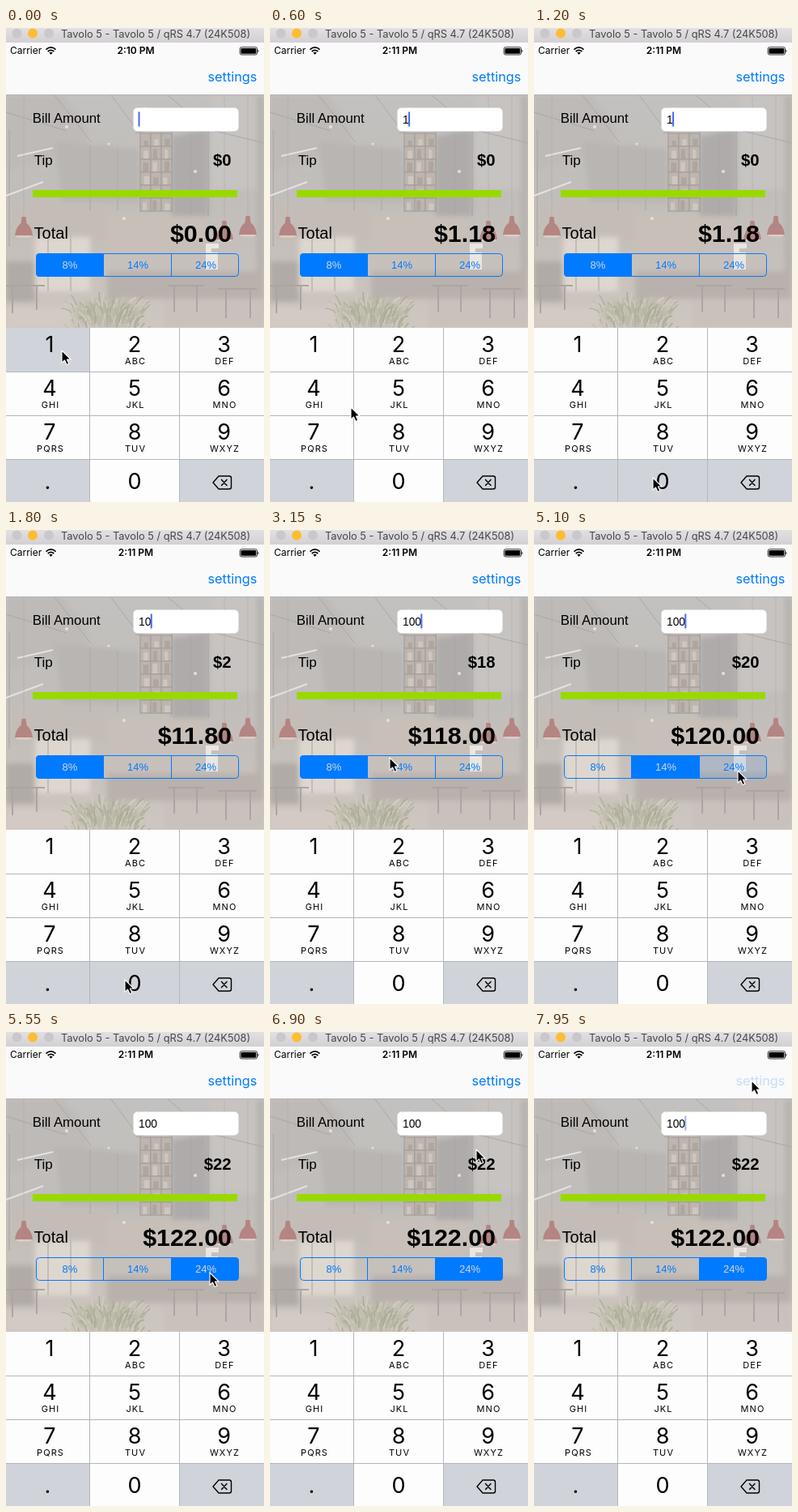
An HTML page that plays this animation: 319 px wide and 585 px high, repeating every 8000 ms.

```html
<!DOCTYPE html>
<html lang="en">
<head>
<meta charset="utf-8">
<title>Tip calculator</title>
<style>
html, body { margin: 0; width: 100%; height: 100%; overflow: hidden; background: #fff; }
svg { display: block; width: 100vw; height: 100vh; }
text { font-family: "Liberation Sans", Arial, sans-serif; fill: #000; white-space: pre; }
.ui { font-family: Inter, Roboto, sans-serif; }
.mid { text-anchor: middle; }
.end { text-anchor: end; font-weight: bold; }
.digit { font-size: 27px; }
.letters { font-size: 11px; letter-spacing: 1.1px; }
.seg { font-size: 13px; }
</style>
</head>
<body>
<svg viewBox="0 0 319 585">
  <defs>
    <linearGradient id="bar" x2="0" y2="1">
      <stop offset="0" stop-color="#e3e0e3"/><stop offset="1" stop-color="#d3d0d3"/>
    </linearGradient>
    <linearGradient id="room" x2="0" y2="1">
      <stop offset="0" stop-color="#c3c1bf"/><stop offset=".4" stop-color="#c0bdba"/>
      <stop offset=".7" stop-color="#c6c0bb"/><stop offset="1" stop-color="#cec6c1"/>
    </linearGradient>
    <filter id="soft" x="-20%" y="-20%" width="140%" height="140%"><feGaussianBlur stdDeviation="3"/></filter>
    <filter id="fine" x="-20%" y="-20%" width="140%" height="140%"><feGaussianBlur stdDeviation=".7"/></filter>
    <clipPath id="photo"><rect y="83" width="319" height="287"/></clipPath>
    <clipPath id="segClip"><rect x="37" y="278" width="251" height="29" rx="4.5"/></clipPath>
    <g id="lamp">
      <path d="M0-170V-14" stroke="#b3aeab" stroke-width=".7"/>
      <path d="M-2.5-16H2.5L3.500-8Q10-3 11 7H-11Q-10-3-3.500-8Z" fill="#b48582"/>
      <path d="M-10 7H10L8 9.500H-8Z" fill="#ddcdc6"/>
    </g>
  </defs>

  <!-- restaurant interior -->
  <g clip-path="url(#photo)">
    <rect y="83" width="319" height="287" fill="url(#room)"/>
    <g filter="url(#soft)">
      <path d="M0 83H70L100 120V150L0 175Z" fill="#bdbab8"/>
      <path d="M60 140L165 150V215H70Z" fill="#b8b5b2"/>
      <path d="M205 134L250 125V232H205Z" fill="#aeabaa"/>
      <path d="M252 83H319V200H252Z" fill="#c6c3c1"/>
      <path d="M0 215H130V262H0Z" fill="#c4bdb7"/>
      <path d="M36 258H104V325H36Z" fill="#ded7cf"/>
      <path d="M125 232H245V275H125Z" fill="#c8c0b8"/>
      <path d="M125 300H319V334H125Z" fill="#b9b1ac"/>
      <path d="M195 334H319V370H195Z" fill="#c9c1bc"/>
      <path d="M0 288H36V338H0Z" fill="#b1aaa6"/>
      <path d="M0 345H90V370H0Z" fill="#d3cac5"/>
      <path d="M310 83H319V300H310Z" fill="#b7b2af"/>
      <ellipse cx="125" cy="352" rx="42" ry="18" fill="#bdbaab"/>
    </g>
    <g filter="url(#fine)" fill="none" stroke="#aba7a4">
      <path d="M0 104L75 127M60 83L105 140M130 83L165 130M160 130L205 118L250 125L319 142M200 83L250 125"/>
      <path d="M250 122V232M205 128V228M228 130V230" stroke-width="1.4"/>
      <path d="M4 125V270M104 145V225M138 150V225" stroke="#b2aeab" stroke-width="1.6"/>
      <path d="M14 158L58 148M0 207L46 190" stroke="#e4e1de" stroke-width="2.2"/>
      <path d="M52 230V325M80 230V325" stroke="#c4bdb6" stroke-width="2"/>
      <path d="M0 318H48M8 318V352M38 318V348M200 318H245M208 318V350M236 318V350M262 322H310M272 322V358M302 322V358" stroke="#aca5a1" stroke-width="2"/>
    </g>
    <g id="shelf" filter="url(#fine)"></g>
    <g filter="url(#fine)">
      <g fill="#e8e0d4">
        <circle cx="75" cy="122" r="2"/><circle cx="127" cy="143" r="1.6"/><circle cx="172" cy="100" r="2"/>
        <circle cx="234" cy="177" r="2"/><circle cx="146" cy="235" r="2"/>
      </g>
      <path d="M247 266H263V272H254V277H262V298H247Z" fill="#ebe6e1"/>
      <use href="#lamp" x="22" y="249"/>
      <use href="#lamp" x="270" y="254"/>
      <use href="#lamp" x="299" y="248"/>
    </g>
    <g id="plant" filter="url(#fine)" fill="none" stroke-width="1.6"></g>
  </g>

  <!-- window bar -->
  <rect width="319" height="18" fill="url(#bar)"/>
  <circle cx="13.500" cy="6.500" r="6" fill="#cac8ca"/>
  <circle cx="33" cy="6.500" r="6" fill="#fdbd2f"/>
  <circle cx="53" cy="6.500" r="6" fill="#cac8ca"/>
  <text class="ui" x="68" y="12" font-size="12.8" style="fill:#464646">Tavolo 5 - Tavolo 5 / qRS 4.7 (24K508)</text>

  <!-- status and navigation -->
  <rect y="18" width="319" height="64" fill="#fafafa"/>
  <rect y="82" width="319" height="1" fill="#b4b3b3"/>
  <text class="ui" x="5" y="32" font-size="12">Carrier</text>
  <g fill="none" stroke="#000" stroke-width="1.7">
    <path d="M49.5 26.6Q55.5 21.2 61.5 26.6M51.7 29Q55.5 25.6 59.3 29"/>
    <path d="M55.5 32.8L53.3 30.6Q55.5 28.8 57.7 30.6Z" fill="#000" stroke="none"/>
  </g>
  <text id="clock" class="ui mid" x="160.5" y="32" font-size="12" font-weight="600"></text>
  <rect x="289.2" y="23.700" width="21.300" height="9.300" rx="2" fill="none" stroke="#000" stroke-width=".8"/>
  <rect x="290.4" y="24.900" width="18.900" height="6.900" rx="1" fill="#000"/>
  <path d="M311.500 26.500Q313.500 28.400 311.500 30.300Z"/>
  <text id="settings" class="ui" x="249.5" y="66" font-size="16.3" style="fill:#007aff">settings</text>

  <!-- form -->
  <text x="32.8" y="117" font-size="16.8">Bill Amount</text>
  <rect x="157.5" y="98.5" width="130" height="29" rx="5" fill="#fff"/>
  <text id="bill" x="164" y="118" font-size="13.8"></text>
  <rect id="caret" y="103.5" width="2" height="18" fill="#426bf2"/>
  <text x="34.8" y="168.5" font-size="17">Tip</text>
  <text id="tip" class="end" x="278.6" y="170" font-size="20.3"></text>
  <rect x="33" y="200" width="253" height="9" fill="#99d900"/>
  <text x="34.6" y="259.6" font-size="20">Total</text>
  <text id="total" class="end" x="279" y="263.5" font-size="30.4"></text>

  <g id="segs" clip-path="url(#segClip)"></g>
  <path d="M120.5 278V307M204.5 278V307" stroke="#007aff"/>
  <rect x="37.5" y="278.5" width="250" height="28" rx="4" fill="none" stroke="#007aff"/>

  <!-- keypad -->
  <g id="keys"></g>
  <path d="M103.5 370V585M214.5 370V585M0 424.5H319M0 478.5H319M0 532.5H319" stroke="#b3b6bb" fill="none"/>
  <g fill="none" stroke="#000" stroke-width="1.4" stroke-linejoin="round" stroke-linecap="round">
    <path d="M256 561L263 553H276Q278.5 553 278.5 555.5V566.5Q278.5 569 276 569H263Z"/>
    <path d="M266.5 557.5L273 564.5M273 557.5L266.5 564.5"/>
  </g>

  <path id="mouse" d="M0 0V15.2L3.5 12L6 17.5L8.8 16.3L6.4 11H11Z" fill="#000" stroke="#fff" stroke-width="1.1" stroke-linejoin="round"/>
</svg>

<script>
const $ = id => document.getElementById(id);
const GREY = '#d0d4da', WHITE = '#fdfdfd', BLUE = '#007aff';
const LOOP = 8000, TICK = 150;

function add(parent, tag, attrs, content = '') {
  const el = document.createElementNS('http://www.w3.org/2000/svg', tag);
  for (const k in attrs) el.setAttribute(k, attrs[k]);
  el.textContent = content;
  return parent.appendChild(el);
}

let seed = 7;
const rnd = () => (seed = seed * 16807 % 2147483647) / 2147483647;

// wall shelf with jars
for (let i = 0; i < 18; i++) {
  const x = 166 + i % 3 * 13, y = 130 + Math.floor(i / 3) * 16, h = 6 + rnd() * 7;
  add($('shelf'), 'rect', { x, y, width: 13, height: 16, fill: '#bdb5ae', stroke: '#a5a19e', 'stroke-width': 1.3 });
  add($('shelf'), 'rect', { x: x + 2 + rnd() * 3, y: y + 15 - h, width: 4 + rnd() * 3, height: h, fill: i % 2 ? '#cfc7bf' : '#aea69f' });
}

// fan of leaves
for (let i = 0; i < 140; i++) {
  const x = 80 + rnd() * 90, y = 336 + rnd() * 38 + Math.abs(x - 126) * .15;
  add($('plant'), 'path', {
    d: `M${x} ${y}q${(x - 126) * .06} -6 ${(x - 126) * .2 + rnd() * 8 - 4} ${-6 - rnd() * 7}`,
    stroke: ['#b3b29f', '#c8c5b3', '#acab99', '#d1ccbd'][i % 4]
  });
}

// keypad
const cols = [[0, 104, 54], [104, 111, 159], [215, 104, 269.5]];
const labels = ['', 'ABC', 'DEF', 'GHI', 'JKL', 'MNO', 'PQRS', 'TUV', 'WXYZ'];
const keys = [...'123456789.0', ''].map((label, i) => {
  const [x, w, mid] = cols[i % 3], y = 370 + Math.floor(i / 3) * 54;
  const box = add($('keys'), 'rect', { x, y, width: w, height: 55, fill: i === 9 || i === 11 ? GREY : WHITE });
  add($('keys'), 'text', { class: 'ui mid digit', x: i === 9 ? 51.5 : mid, y: y + (i > 8 ? 37 : 29.5) }, label);
  add($('keys'), 'text', { class: 'ui mid letters', x: mid + 1, y: y + 45 }, labels[i]);
  return box;
});

// tip choices
const rates = [.18, .2, .22];
const segs = ['8%', '14%', '24%'].map((label, i) => ({
  box: add($('segs'), 'rect', { x: 37 + i * 83.7, y: 278, width: 83.7, height: 29, fill: BLUE }),
  text: add($('segs'), 'text', { class: 'mid seg', x: 79 + i * 84, y: 297 }, label)
}));

// pointer path: time, x, y
const path = [
  [300, 69, 398], [450, 78, 420], [600, 100, 468], [750, 125, 518], [900, 142, 547], [1050, 147, 555],
  [2400, 147, 555], [2550, 152, 525], [2700, 176, 440], [2850, 184, 355], [3000, 163, 300], [3150, 148, 281],
  [4200, 148, 281], [4350, 176, 287], [4500, 230, 297], [4650, 252, 297],
  [6750, 252, 297], [6900, 255, 145], [7050, 262, 95], [7200, 268, 67], [7350, 269, 60]
];
function pointer(t) {
  const i = path.findIndex(p => p[0] > t);
  if (i === 0) return path[0].slice(1);
  if (i < 0) return path[path.length - 1].slice(1);
  const [t0, x0, y0] = path[i - 1], [t1, x1, y1] = path[i], k = (t - t0) / (t1 - t0);
  return [x0 + (x1 - x0) * k, y0 + (y1 - y0) * k];
}

function caretAlpha(t) {
  if (t < 1950) return 1;
  const p = t % 1000 / 1000;
  if (p < .42) return 1;
  if (p < .54) return (.54 - p) / .12;
  return p < .9 ? 0 : (p - .9) / .1;
}

const within = (t, a, b) => t >= a && t < b;

function draw(t) {
  const bill = t < 150 ? '' : t < 1350 ? '1' : t < 1950 ? '10' : '100';
  const pick = t < 3750 ? 0 : t < 5250 ? 1 : 2;
  const held = within(t, 3600, 3750) ? 1 : within(t, 5100, 5250) ? 2 : -1;
  const tip = bill * rates[pick];

  $('clock').textContent = t < 150 ? '2:10 PM' : '2:11 PM';
  $('bill').textContent = bill;
  $('tip').textContent = '$' + Math.round(tip);
  $('total').textContent = '$' + (+bill + tip).toFixed(2);
  $('caret').setAttribute('x', 163.5 + bill.length * 7.6);
  $('caret').setAttribute('opacity', caretAlpha(t));
  $('settings').setAttribute('opacity', t < 7800 ? 1 : .22);

  segs.forEach(({ box, text }, i) => {
    box.setAttribute('fill-opacity', i === pick ? 1 : i === held ? .12 : 0);
    text.style.fill = i === pick ? '#cfd8e2' : BLUE;
  });
  keys[0].setAttribute('fill', t < 150 ? GREY : WHITE);
  keys[10].setAttribute('fill', within(t, 1200, 1350) || within(t, 1800, 1950) ? GREY : WHITE);
  $('mouse').setAttribute('transform', `translate(${pointer(t)})`);
}

const start = performance.now();
function loop(now) {
  const t = Math.max(0, now - start) % LOOP;
  draw(Math.floor(t / TICK) * TICK);
  requestAnimationFrame(loop);
}
draw(0);
requestAnimationFrame(loop);
</script>
</body>
</html>
```
